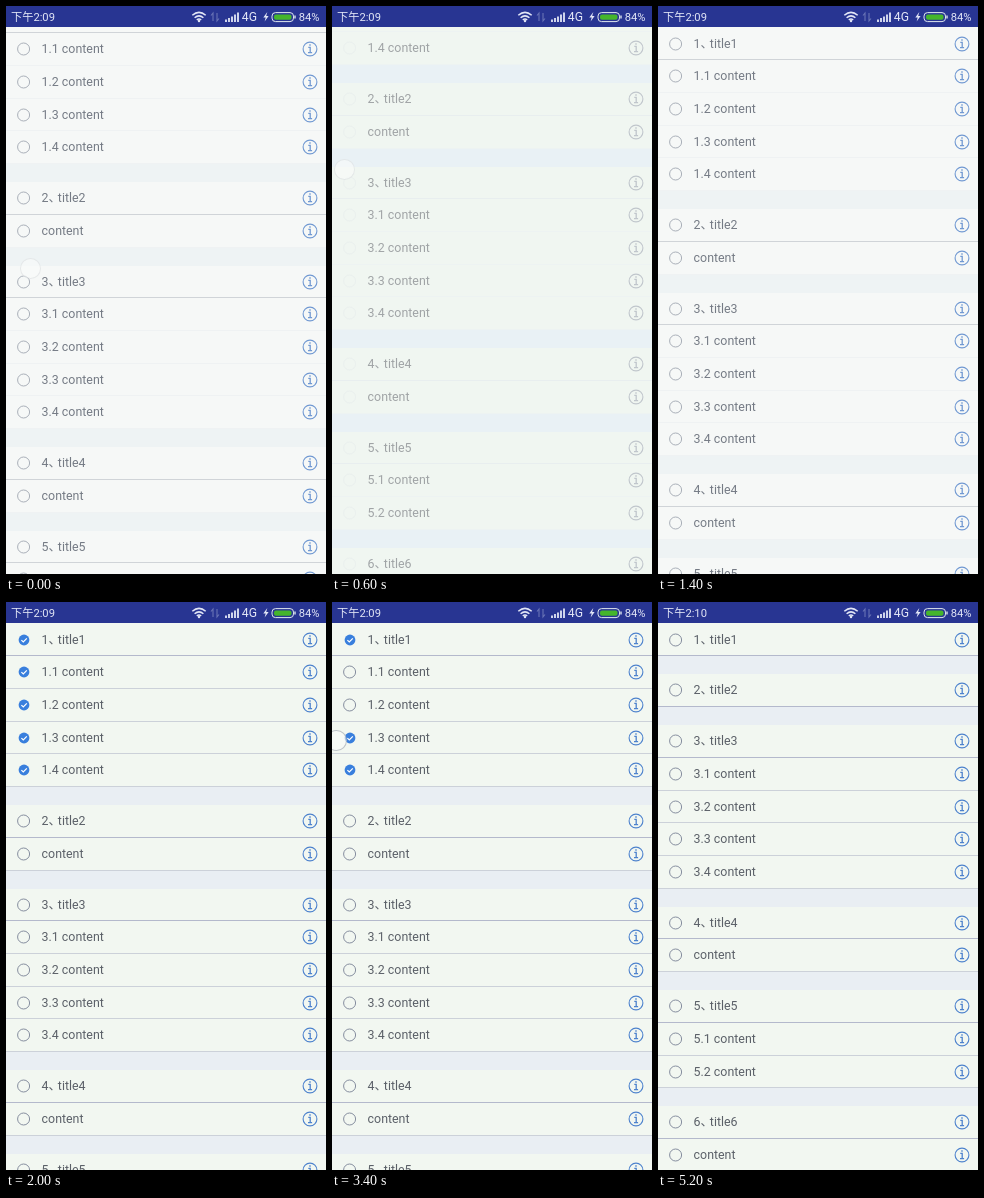
An HTML page that plays this animation: 320 px wide and 568 px high, repeating every 5.4 s.

```html
<!DOCTYPE html>
<html lang="zh">
<head>
<meta charset="utf-8">
<title>Expandable checklist</title>
<style>
  html, body { margin: 0; width: 100%; height: 100%; overflow: hidden; }
  #stage {
    position: relative; width: 320px; height: 568px; overflow: hidden;
    font: 12.4px Roboto, "Noto Sans CJK SC", "Noto Sans CJK", sans-serif;
    --gap: #e9eef3; --row: #f2f7f1; --line: #ccd1d9; --title-line: #b4b9cc;
    --text: #5b6068; --ring: #868e9f; --info: #4d82cd;
    background: var(--gap); color: var(--text);
  }
  /* paler look around and during scrolling */
  #stage.soft {
    --gap: #eef3f4; --row: #f6f8f7; --line: #eff2f3; --title-line: #d0d4d8;
    --text: #757b85; --ring: #aab0b9; --info: #7199d2;
  }
  #stage.moving {
    --gap: #e9f1f5; --row: #f0f6f1; --line: #edf3f2; --title-line: #e8eeef;
    --text: #a0a4a6; --ring: #eaf0ee; --info: #c0c6cc;
  }
  #bar { position: absolute; z-index: 2; left: 0; top: 0; width: 320px; height: 21px; background: #283592; }
  #bar text { fill: #e2e6f6; font-size: 11.2px; }
  #list { position: absolute; left: 0; top: 21.7px; width: 320px; }
  .section { margin-bottom: 18.1px; }
  .section:first-child { box-shadow: 0 -1px var(--row); }
  .section.closed .child { display: none; }
  .row {
    position: relative; height: 32.7px; line-height: 32.7px; padding-left: 35.6px;
    box-sizing: border-box; background: var(--row); white-space: pre;
    border-bottom: 1px solid var(--line);
  }
  .title { border-color: var(--title-line); }
  .comma { letter-spacing: -.25em; }
  .row svg { position: absolute; left: 0; top: 0; width: 320px; height: 33px; }
  .ring { fill: none; stroke: var(--ring); }
  .tick { visibility: hidden; }
  .on .tick { visibility: visible; }
  .on .ring { visibility: hidden; }
  .info { fill: none; stroke: var(--info); stroke-width: 1.1; }
  #touch {
    position: absolute; z-index: 3; left: -10.5px; top: -10.5px; width: 21px; height: 21px;
    box-sizing: border-box; border: 1.3px solid rgba(160, 166, 176, .65);
    border-radius: 50%; background: rgba(250, 252, 250, .6);
  }
  .soft #touch { border-color: rgba(160, 166, 176, .2); }
</style>
</head>
<body>
<div id="stage">
  <svg id="bar" viewBox="0 0 320 21">
    <text id="clock" x="5" y="15"></text>
    <g fill="none" stroke="#e2e6f6" stroke-width="1.5">
      <path d="M186.3 9.3Q193 3.5 199.7 9.3M188.6 11.8Q193 8 197.4 11.8M190.8 14Q193 12 195.2 14"/>
      <path d="M207 15V7l-2 2.5M211 7v8l2-2.5" stroke="#6873b5" stroke-width="1.1"/>
      <path d="M220 16v-2.5M223 16v-4M226 16v-5.5M229 16V8.5M232 16V6.5" stroke-width="1.8"/>
    </g>
    <circle cx="193" cy="15" r="1.2" fill="#e2e6f6"/>
    <text x="235.8" y="15.4" style="font-size:12.2px">4G</text>
    <path d="M261.3 6l-4 5.4h2.4l-1.1 4 4-5.4h-2.4z" fill="#e2e6f6"/>
    <rect x="266" y="6.6" width="21.5" height="9" rx="3.5" fill="none" stroke="#dfe7ee"/>
    <rect x="268" y="8.4" width="17.5" height="5.4" rx="2" fill="#45b52c"/>
    <path d="M289 9.5v3" stroke="#dfe7ee" stroke-width="1.4"/>
    <text x="292.7" y="15">84%</text>
  </svg>
  <div id="list"></div>
  <div id="touch"></div>
</div>
<script>
const STEP = 200, LOOP = 5400;
const childCounts = [4, 1, 4, 1, 2, 1];

const icons = `<svg viewBox="0 0 320 33">
  <circle class="ring" cx="17.6" cy="16" r="6"/>
  <g class="tick"><circle cx="18" cy="16" r="5.4" fill="#397fdd"/>
    <path d="M15.4 16.1l1.9 1.9 3.5-3.7" fill="none" stroke="#fff" stroke-width="1.2"/></g>
  <g class="info"><circle cx="304" cy="16" r="6.9"/>
    <path d="M302.3 14.4h1.9v5.2M302 19.7h4.1M303.3 12h1.4" stroke-width="1.3"/></g>
</svg>`;

const row = (kind, label) => `<div class="row ${kind}">${label}${icons}</div>`;
const section = (count, i) => {
  const n = i + 1;
  const children = Array.from({ length: count }, (_, k) =>
    row('child', count > 1 ? `${n}.${k + 1} content` : 'content'));
  return `<div class="section">${row('title', `${n}<span class="comma">、</span>title${n}`)}${children.join('')}</div>`;
};

const $ = id => document.getElementById(id);
const stage = $('stage'), list = $('list'), touch = $('touch'), clock = $('clock');
list.innerHTML = childCounts.map(section).join('');
const sections = [...list.children];
const firstRows = [...sections[0].children];

const scrolls = [27, 85, 143, 126, 85, 40, 10];

// [from, to, x, y]
const taps = [
  [1600, 1800, 19, 42],
  [2200, 2400, 20, 78],
  [2600, 2800, 21, 119.5],
  [3400, 3600, 4, 138],
  [3800, 4000, 18, 42],
  [4400, 4600, 63.5, 225],
  [5000, 5200, 63, 42]
];
const checkedUntil = [4000, 2400, 2800, 3600, LOOP];
const closedFrom = [5000, 4400];

function finger(t, scroll) {
  if (t < 1000) return [24 - t / 50, 289 - scroll];
  const tap = taps.find(([from, to]) => t >= from && t < to);
  return tap && tap.slice(2);
}

function draw(now) {
  const step = Math.floor(now % LOOP / STEP), t = step * STEP;
  const scroll = scrolls[step] || 0;
  list.style.transform = `translateY(${-scroll}px)`;
  stage.classList.toggle('soft', t < 1600);
  stage.classList.toggle('moving', t > 0 && t < 1400);
  firstRows.forEach((r, i) => r.classList.toggle('on', t >= 1800 && t < checkedUntil[i]));
  closedFrom.forEach((from, i) => sections[i].classList.toggle('closed', t >= from));
  clock.textContent = t < 4000 ? '下午2:09' : '下午2:10';
  const at = finger(t, scroll);
  touch.style.visibility = at ? 'visible' : 'hidden';
  if (at) touch.style.transform = `translate(${at[0]}px, ${at[1]}px)`;
}

const start = performance.now();
function tick() {
  draw(performance.now() - start);
  requestAnimationFrame(tick);
}
tick();
</script>
</body>
</html>
```
